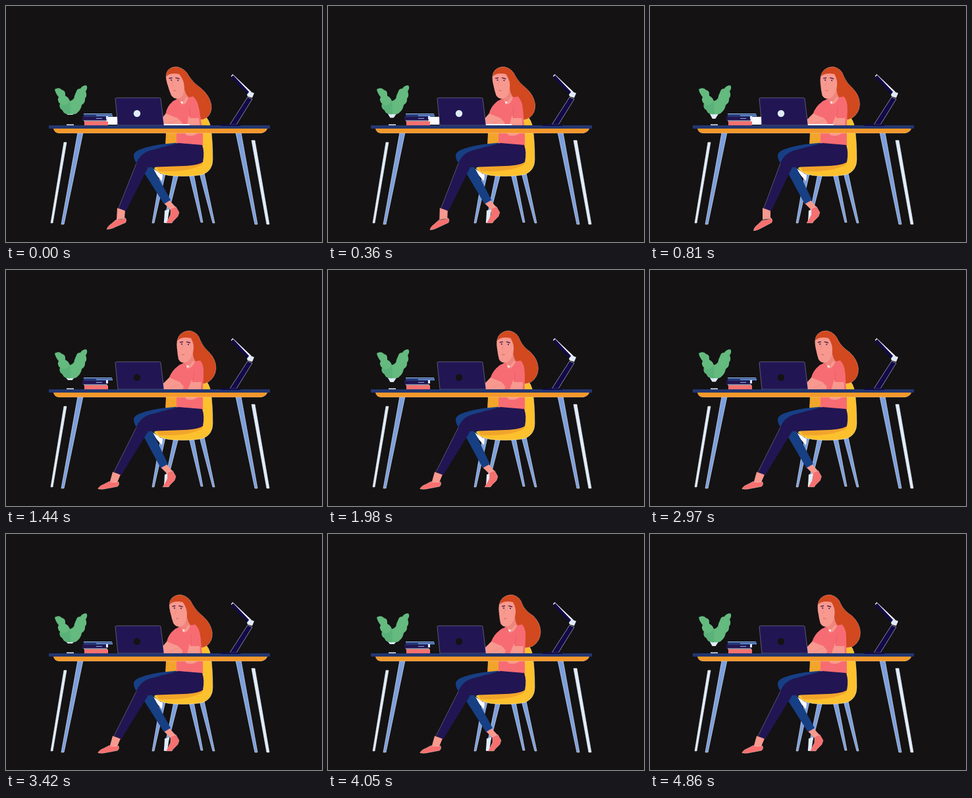
These frames come from a looping animation (480 by 360 pixels, 4.92 s). An HTML page with a canvas:

```html
<!DOCTYPE html>
<html lang="en">
<head>
<meta charset="utf-8">
<title>Woman at a desk</title>
<style>
html, body { margin: 0; width: 100%; height: 100%; overflow: hidden; background: #141213; }
canvas { display: block; width: 480px; height: 360px; }
</style>
</head>
<body>
<canvas id="stage" width="480" height="360"></canvas>
<script>
const ctx = document.getElementById("stage").getContext("2d");
const LOOP = 4920;
const C = {
  back: "#141213", navy: "#211653", ink: "#120a48", blue: "#173f84", steel: "#7b9fdd",
  pale: "#e0ecfa", desk: "#24366f", orange: "#f5982a", yellow: "#fdc12e", amber: "#f2a52b",
  pink: "#f76c73", rose: "#f6706f", skin: "#f7998f", shade: "#ee857e",
  hair: "#d2481f", green: "#64ba7f", leaf: "#5ab179", white: "#fbfcff"
};

// Value tracks: [time, value] pairs joined with a soft ease.
const tracks = {
  sway: [[0, -20], [810, -1], [1440, 0], [2520, -8], [3420, -14], [4050, 0], [4860, -6]],
  swing: [[0, 1], [810, 0], [1440, 0], [2520, 4], [3420, 0], [4050, 4], [4860, 3]],
  heel: [[0, 182], [810, 185], [1080, 184], [1440, 171]],
  tilt: [[0, 20], [810, 24], [1080, 23], [1440, 7]],
  cuff: [[0, 171], [810, 173], [1080, 173], [1440, 164]],
  rear: [[0, 5], [810, 0], [2520, 0], [3420, 5]],
  pages: [[0, 1], [1080, 1], [1350, 0]],
  pot: [[0, 3], [540, 9], [1080, 9], [1440, 5], [2520, 11], [3420, 4], [4050, 5], [4860, 8]]
};

function valueAt(keys, t) {
  const i = keys.findIndex(k => k[0] > t);
  if (i < 0) return keys[keys.length - 1][1];
  const [t0, a] = keys[i - 1], [t1, b] = keys[i];
  const u = (t - t0) / (t1 - t0);
  return a + (b - a) * u * u * (3 - 2 * u);
}

function draw(path, fill, edge) {
  const p = new Path2D(path);
  ctx.fillStyle = fill;
  ctx.fill(p);
  if (edge) {
    ctx.strokeStyle = edge;
    ctx.lineWidth = 0.8;
    ctx.stroke(p);
  }
}

function rect(x, y, w, h, fill) {
  ctx.fillStyle = fill;
  ctx.fillRect(x, y, w, h);
}

function line(x0, y0, x1, y1, width, color) {
  ctx.strokeStyle = color;
  ctx.lineWidth = width;
  ctx.beginPath();
  ctx.moveTo(x0, y0);
  ctx.lineTo(x1, y1);
  ctx.stroke();
}

function dot(x, y, r, fill) {
  ctx.fillStyle = fill;
  ctx.beginPath();
  ctx.arc(x, y, r, 0, 7);
  ctx.fill();
}

function leg(x0, y0, w0, x1, y1, w1, fill) {
  draw(`M${x0} ${y0}h${w0}L${x1 + w1} ${y1}h${-w1}Z`, fill, "rgba(240,245,255,.75)");
}

function chair() {
  leg(235, 256, 7, 222, 331, 3, C.steel);
  leg(255, 256, 7, 240, 330, 3, C.steel);
  leg(278, 256, 7, 296, 330, 3, C.steel);
  leg(294, 255, 7, 314, 331, 3, C.steel);
  draw("M242 212L243 194H262V212Z", C.amber);
  draw("M291 168H302Q309 173 311 186Q314 205 314 234Q314 251 299 257Q280 261 252 259Q230 257 225 247L240 241L291 236Z",
    C.yellow, "rgba(255,250,235,.5)");
  draw("M229 246L299 229Q301 240 296 243Q274 254 232 252Z", C.amber);
  draw("M222 247L229 252L238 258L237 267Q229 260 222 247Z", C.white);
}

function legs(p) {
  const r = p.rear;
  // rear leg and foot
  draw("M241 312L248 310L245 331H240Z", C.pale);
  draw(`M${235 + r} 301L${244 + r * .8} 296L${253 + r} 307L${245 + r} 311Z`, C.skin);
  draw(`M${245 + r} 309L${253 + r} 306L${258 + r} 315L${256 + r} 321L${249 + r} 328L${247 + r} 331H${238 + r}L${241 + r} 326L${245 + r} 318Z`,
    C.rose, "rgba(255,235,235,.4)");
  draw(`M194 230Q193 223 203 219Q222 212 245 210L266 208V225L220 241L${246 + r * .8} 296L${235 + r} 302L207 250L199 241Q195 236 194 230Z`, C.blue);

  // front foot, turning around its heel
  const c = p.cuff, h = p.heel;
  draw(`M${c - 2} 308L${c + 10} 312L${h - 2} 324L${h - 14} 326Z`, C.skin);
  ctx.save();
  ctx.translate(h, 326);
  ctx.rotate(-p.tilt * Math.PI / 180);
  draw("M0 -3Q2 1 -2 4L-18 5Q-27 6 -32 4Q-30 0 -22 -2L-14 -5Q-6 -2 0 -3Z", C.rose, "rgba(255,235,235,.4)");
  ctx.restore();
  draw("M259 194H299V214H259Z", C.pink);
  draw("M272 194H291Q284 200 274 197Z", C.skin);
  draw(`M198 240Q203 226 217 221Q238 215 262 209L298 212Q302 223 299 238Q292 243 270 244L216 246L${c + 11} 313L${c} 308Z`, C.navy);
  line(198, 240, c, 308, .6, "rgba(235,230,255,.5)");
}

function upperBody(p) {
  ctx.save();
  // lean: shear with the desk line held still
  const k = p.sway / 97;
  ctx.transform(1, 0, -k, 1, 190 * k, 0);
  const g = p.swing;

  draw(`M260 120Q258 105 265 98Q272 92 281 93Q292 96 295 107Q299 117 ${308 + g} 125Q${319 + g} 136 ${319 + g} 150Q${318 + g} 164 ${307 + g} 171Q299 176 291 172L274 136Z`,
    C.hair, "rgba(255,225,210,.4)");
  draw("M272 128L284 121Q283 136 290 142L278 153L268 143Q274 139 272 128Z", C.shade);
  draw("M263 145L272 141Q275 150 284 140L295 138Q301 145 300 158L299 183H255L249 166Q253 154 263 145Z", C.pink);
  draw("M272 141Q276 151 284 139L287 140Q282 151 275 150Z", C.skin);
  dot(276, 147, 1.5, C.white);

  // face
  draw("M260 108Q267 101 281 104Q287 114 284 126Q281 138 273 141Q265 143 262 136Q259 122 260 108Z", C.skin);
  line(264, 110.5, 269, 109.5, 1.6, "#552544");
  line(274, 109.5, 280, 111, 1.6, "#552544");
  dot(267, 113, 1, C.navy);
  dot(277, 113.5, 1, C.navy);
  line(269, 114, 267, 122, .7, C.shade);
  line(267, 129, 271, 129, 1, "#dc5c60");

  // folded arms
  draw("M249 163L262 168L270 178L268 183H239V173Z", C.skin);
  draw("M282 168H297L296 183H276Z", C.skin);
  draw("M262 146Q252 153 248 164L262 170L272 172L280 160Z", C.pink);
  draw("M286 150Q298 145 300 158L299 171L283 171Z", C.pink);
  line(286, 153, 284, 170, .7, "#e75b66");
  line(250, 179, 264, 174, .7, C.shade);
  ctx.restore();
}

function plant(p) {
  draw(`M90 163H105L${102 - p.pot * .3} ${163 + p.pot}H${93 + p.pot * .2}Z`, C.pale);
  rect(92, 180.5, 11, 1.5, C.pale);
  draw("M74 127Q81 123 85 128Q91 129 90 137Q95 139 97 145Q104 143 104 137L107 130Q108 126 113 126Q116 121 122 121Q125 125 121 130Q124 137 120 141Q121 147 115 151Q114 158 109 162Q106 166 98 165Q88 166 86 159Q80 156 82 149Q77 144 80 139Q75 133 74 127Z",
    C.green);
  draw("M97 145L98 165Q88 166 86 159Q80 156 82 149Q90 155 97 145Z", C.leaf);
}

function books(p) {
  ctx.globalAlpha = p.pages;
  rect(152, 169, 17, 12, C.white);
  rect(239, 180, 40, 2, C.white);
  ctx.globalAlpha = 1;
  rect(119, 176, 36, 6, C.rose);
  rect(116, 168, 37, 7, C.navy);
  rect(118, 165, 44, 4, "#263974");
  rect(118, 164, 43, 1.2, "#8db2e6");
  rect(137, 166.5, 25, 1.4, "#77a5df");
  rect(137, 171, 9, 1, "#8db2e6");
  rect(118, 174.6, 36, 1, C.white);
  rect(152, 168, 3, 5, C.pale);
}

function lamp() {
  line(343, 105.5, 371, 132, 4, C.white);
  line(343.5, 107, 369, 134, 4.5, C.ink);
  draw("M366 135L370 130L377 133L374 140L367 138Z", C.pale);
  draw("M340 181L367 139L374 142L350 181Z", C.ink, "rgba(240,245,255,.65)");
  rect(326, 180.5, 30, 2.5, C.ink);
}

function laptop(p) {
  draw("M166 142Q166 140 168 140H233Q235 140 235 142L240 182H170Z", C.navy, "rgba(235,235,255,.4)");
  dot(199, 164, 5.2, p.pages > .5 ? C.pale : C.back);
}

function scene(t) {
  const p = {};
  for (const name in tracks) p[name] = valueAt(tracks[name], t);
  rect(0, 0, 480, 360, C.back);

  leg(88, 208, 4, 68, 331, 3, C.pale);
  leg(373, 205, 5, 396, 333, 4, C.pale);
  leg(109, 193, 8, 84, 333, 4, C.steel);
  leg(349, 193, 8, 378, 333, 4, C.steel);
  chair();
  legs(p);
  upperBody(p);
  plant(p);
  books(p);
  laptop(p);

  draw("M72 186H397Q396 192 388 194H80Q73 193 72 186Z", C.orange, "rgba(255,245,230,.35)");
  rect(65, 182, 336, 5, C.desk);
  lamp();
}

// The picture changes in steps, with two short ones at the start.
function stepTime(t) {
  if (t < 90) return t < 30 ? 0 : 30;
  return Math.floor(t / 90) * 90;
}

const start = performance.now();
function tick() {
  scene(stepTime((performance.now() - start) % LOOP));
  requestAnimationFrame(tick);
}
tick();
</script>
</body>
</html>
```
